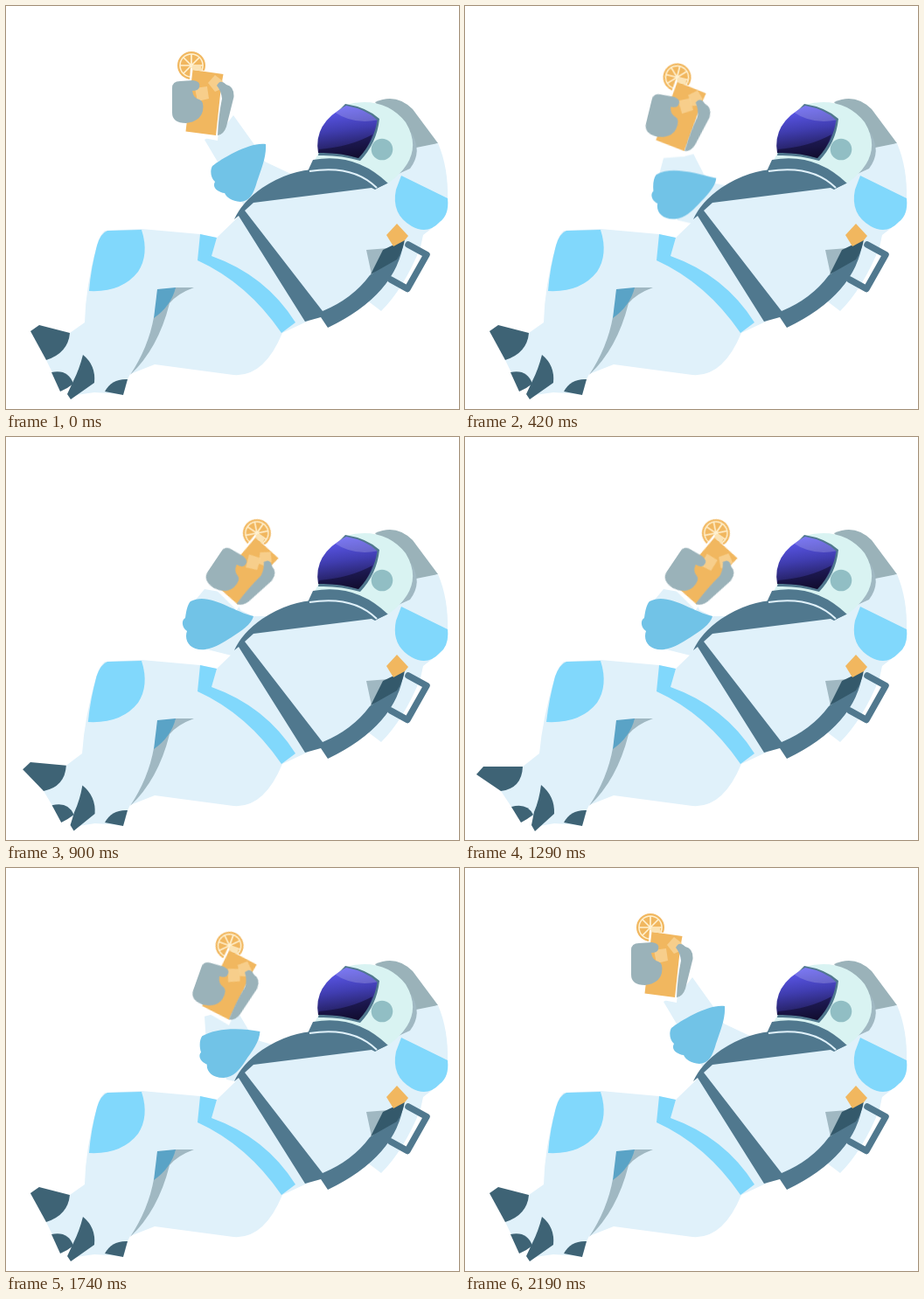
These frames come from a looping animation (518 px wide and 461 px high, 2220 ms). An HTML page:

```html
<!DOCTYPE html>
<html lang="en">
<head>
<meta charset="utf-8">
<title>Lounging astronaut</title>
<style>
  html, body { margin: 0; width: 100%; height: 100%; overflow: hidden; background: #fff; }
  svg { display: block; width: 100vw; height: 100vh; }

  .suit { fill: #e0f1fa; }
  .sky { fill: #81d8fc; }
  .cuff { fill: #71c3e7; }
  .band { fill: #50788e; }
  .boot { fill: #3e6375; }
  .glove { fill: #9ab2b9; }
  .shade { fill: #a0b8c2; }
  .juice { fill: #f1b75f; }
  .cube { fill: #f8d293; fill-opacity: .85; }

  .arm, .leg, .hand, .fingers, .thumb, .cube { animation: 2220ms cubic-bezier(.37, 0, .63, 1) infinite; }

  /* Bending parts blend between outlines --a and --b; the arm dips midway */
  .arm, .leg { d: var(--a); }
  .arm { animation-name: arm, dip; }
  .leg { animation-name: leg; }
  @keyframes arm {
    0%, 10.81% { d: var(--a); }
    23.87%, 71.17% { d: var(--b); }
    85.14%, 100% { d: var(--a); }
  }
  @keyframes dip {
    0%, 10.81%, 23.87%, 71.17%, 85.14%, 100% { transform: translateY(0px); }
    17.8%, 78.2% { transform: translateY(7px); }
  }
  @keyframes leg {
    0%, 27.03% { d: var(--a); }
    51.35%, 58.11% { d: var(--b); }
    79.73%, 100% { d: var(--a); }
  }

  /* The glass swings about the wrist while fingers and thumb slide on it */
  .hand { transform-origin: 228px 147px; animation-name: hand; }
  .fingers { --slide: translate(0px, 13.6px); animation-name: grip; }
  .thumb { --slide: translate(-4px, 0px); animation-name: grip; }
  @keyframes hand {
    0%, 13% { transform: translate(0px, 0px) rotate(0deg); }
    26.58%, 72.16% { transform: translate(28px, 37.4px) rotate(34deg); }
    86.04%, 100% { transform: translate(0px, 0px) rotate(0deg); }
  }
  @keyframes grip {
    0%, 13% { transform: translate(0px, 0px); }
    26.58%, 72.16% { transform: var(--slide); }
    86.04%, 100% { transform: translate(0px, 0px); }
  }

  .cube { transform-box: fill-box; transform-origin: center; }
  .low { animation-name: low; }
  .high { animation-name: high; }
  @keyframes low {
    0%, 100% { transform: translate(0px, 0px) rotate(0deg); }
    28% { transform: translate(7px, -4px) rotate(-24deg); }
    41% { transform: translate(3px, -2px) rotate(-8deg); }
    58% { transform: translate(0px, 0px) rotate(6deg); }
    78% { transform: translate(4px, -2px) rotate(-10deg); }
  }
  @keyframes high {
    0%, 100% { transform: translate(0px, 0px) rotate(0deg); }
    19% { transform: translate(-2px, -2px) rotate(8deg); }
    28% { transform: translate(-3px, 3px) rotate(22deg); }
    41% { transform: translate(-4px, -2px) rotate(12deg); }
    58% { transform: translate(-1px, 0px) rotate(-6deg); }
    78% { transform: translate(-3px, -1px) rotate(8deg); }
  }
</style>
</head>
<body>
<svg viewBox="0 0 518 461" preserveAspectRatio="none">
  <defs>
    <linearGradient id="visor" x1=".4" y1="0" x2=".55" y2="1">
      <stop offset="0" stop-color="#5f5bf2"/>
      <stop offset=".45" stop-color="#403db0"/>
      <stop offset="1" stop-color="#17123c"/>
    </linearGradient>
  </defs>

  <!-- Raised arm -->
  <path class="arm suit" style="
    --a: path('M227 153 L250 138 L260 125 L285 160 L296 178 L332 195 L310 235 L272 228 L243 180 Z');
    --b: path('M227 174 L250 178 L262 180 L268 198 L283 205 L307 205 L290 258 L230 243 L212 192 Z')"/>
  <path class="arm cuff" style="
    --a: path('M297 158 C298 172 292 186 287 201 C283 215 279 223 268 224 C258 223 252 219 250 214 C243 213 235 208 239 201 C234 197 233 188 236 183 C247 174 280 155 297 158 Z');
    --b: path('M283 205 C281 214 269 222 258 229 C248 235 240 241 228 243 C211 245 203 233 207 222 C200 217 201 209 205 207 C206 198 208 191 211 188 C232 177 258 199 283 205 Z')"/>

  <!-- Drink and glove -->
  <g class="hand">
    <g transform="translate(212 68)">
      <circle class="juice" r="16"/>
      <circle r="13.800" fill="#fff1d0"/>
      <circle class="juice" r="12.300"/>
      <path d="M-13 0H13M0 -13V13M-9 -9L9 9M9 -9L-9 9" stroke="#fff1d0" stroke-width="1.700"/>
    </g>
    <path fill="#fff" d="M211 71 L249 78 L242 154 L205 147 Z"/>
    <path class="juice" d="M213.500 73 L248.500 78 L246 92 L240 148 L205.500 143.500 Z"/>
    <path d="M213 68 L223 69 L224 74.500 L213 73 Z" fill="#fbe3b4"/>
    <path class="cube low" d="M216 94 L230 92 L232 106 L219 109 Z"/>
    <path class="cube high" d="M231 88 L239 79 L248 86 L246 95 L239 98 Z"/>
    <path class="glove thumb" d="M241 91 Q245 83 252 90 Q261 92 260.500 104 L252 138 Q249 147 242 148 Q243 125 247 106 Q246 97 241 91 Z"/>
    <path class="glove fingers" d="M190 94 Q190 86 199 86 L214 85 Q223 86 221 93 Q220 97 213 97 Q214 105 221 107 Q227 109 225 120 Q222 132 206 134 Q190 134 190 122 Z"/>
  </g>

  <!-- Hips and legs -->
  <path class="leg suit" style="
    --a: path('M113 257 L155 255 L222 261 L241 265 L269 238 L346 360 L316 374 Q295 425 260 422 L170 410 L142 421 L139 427 L134 444 L101 442 L73 446 L76 434 L62 438 L46 405 L73 374 L90 362 Q91 320 104 274 Q107 262 113 257 Z');
    --b: path('M113 257 L155 255 L222 261 L241 265 L269 238 L346 360 L316 374 Q295 425 260 422 L170 410 L142 421 L139 427 L134 444 L102 442 L80 446 L78 434 L63 438 L41 405 L66 377 L85 362 Q89 320 103 274 Q107 262 113 257 Z')"/>
  <path class="leg sky" style="
    --a: path('M116 257 L155 256 Q164 284 151 304 Q132 328 95 326 Q97 300 104 274 Q108 260 116 257 Z');
    --b: path('M116 257 L155 256 Q164 284 151 304 Q132 328 93 326 Q96 300 103 274 Q108 260 116 257 Z')"/>
  <path class="shade" d="M193 322 L215 322 Q196 329 187 340 Q174 392 142 422 Q163 390 169 356 Z"/>
  <path d="M173 324 L194 322 Q189 343 169 357 Z" fill="#5aa3c6"/>
  <path class="leg boot" style="
    --a: path('M28 372 L38 365 L73 374 Q71 397 46 405 Z');
    --b: path('M13 386 L21 377 L66 377 Q65 402 41 405 Z')"/>
  <path class="leg boot" style="
    --a: path('M52 419 Q71 415 77 432 L70 437 L62 441 Z');
    --b: path('M53 423 Q71 418 78 432 L71 437 L64 441 Z')"/>
  <path class="leg boot" style="
    --a: path('M88 399 Q103 411 101 431 L74 450 L70 444 L77 429 Q84 415 88 399 Z');
    --b: path('M87 398 Q103 411 102 431 L80 451 L76 444 L79 429 Q85 415 87 398 Z')"/>
  <path class="boot" d="M113 441 Q121 426 139 427 L134 445 Z"/>
  <path class="sky" d="M222 261 L241 265 L235 286 Q297 308 331 362 L315 374 Q276 317 219 291 Z"/>

  <!-- Pack and rear arm -->
  <path class="glove" d="M422 110 Q446 99 465 118 L494 157 L466 166 Z"/>
  <path class="suit" d="M464 163 L494 157 Q506 185 505 221 L495 248 L477 262 L474 276 Q455 323 429 349 L408 333 L430 230 L434 200 Z"/>
  <path class="shade" d="M463 144 Q477 166 462 186 L440 196 Z"/>
  <path d="M460 273 L481 284.500 L459 323.500 L440 313" fill="none" stroke="#50788e" stroke-width="7.500" stroke-linecap="round" stroke-linejoin="round"/>

  <!-- Helmet -->
  <path d="M388 113 Q432 102 457 133 Q480 171 438 202 L425 208 L352 178 L357 169 Z" fill="#d9f3f2"/>
  <path class="band" d="M388 112 Q413 116 427 129 Q424 157 405 177 Q381 170 357 171 Q363 135 388 112 Z"/>
  <path d="M389 114 Q412 118 424.500 130.500 Q421 155 403 174 Q381 167 357 168 Q351 134 389 114 Z" fill="url(#visor)"/>
  <path d="M389 114 Q412 118 424.500 130.500 Q397 136 375 121 Z" fill="#fff" fill-opacity=".18"/>
  <path d="M358 164 Q394 161 419 147 Q414 163 403 174 Q381 167 357 168 Z" fill="#0c0824" fill-opacity=".5"/>
  <circle cx="430" cy="164" r="12.300" fill="#91bec4"/>

  <!-- Torso -->
  <path class="band" d="M345 189 L351 176 Q400 167 437 203 L424 209 Z"/>
  <path class="band" d="M261 244 Q270 224 293 208 Q325 187 356 187 Q402 187 424 208 L455 268 Q447 330 368 368 L360 356 L342 361 L266 240 Z"/>
  <path d="M347 189 Q397 181 424 208" fill="none" stroke="#e0f1fa" stroke-width="2"/>
  <path class="suit" d="M273 234 L283 225 L418 208 L422 210 L438 202 L470 230 L455 268 L447 285 L416 308 Q396 335 362 349 Z"/>
  <path class="shade" d="M412 279 L437 277 L418 307 Z"/>
  <path d="M431 279 L456 267 Q454 280 447 290 L417 307 Z" fill="#34596b"/>
  <path class="sky" d="M452 194 L505 220 Q507 239 496 247 Q482 262 464 252 Q440 238 446 210 Z"/>
  <path class="juice" d="M447 249 L460 263 L456 268 L443 275 L435 262 Z"/>
</svg>
</body>
</html>
```
